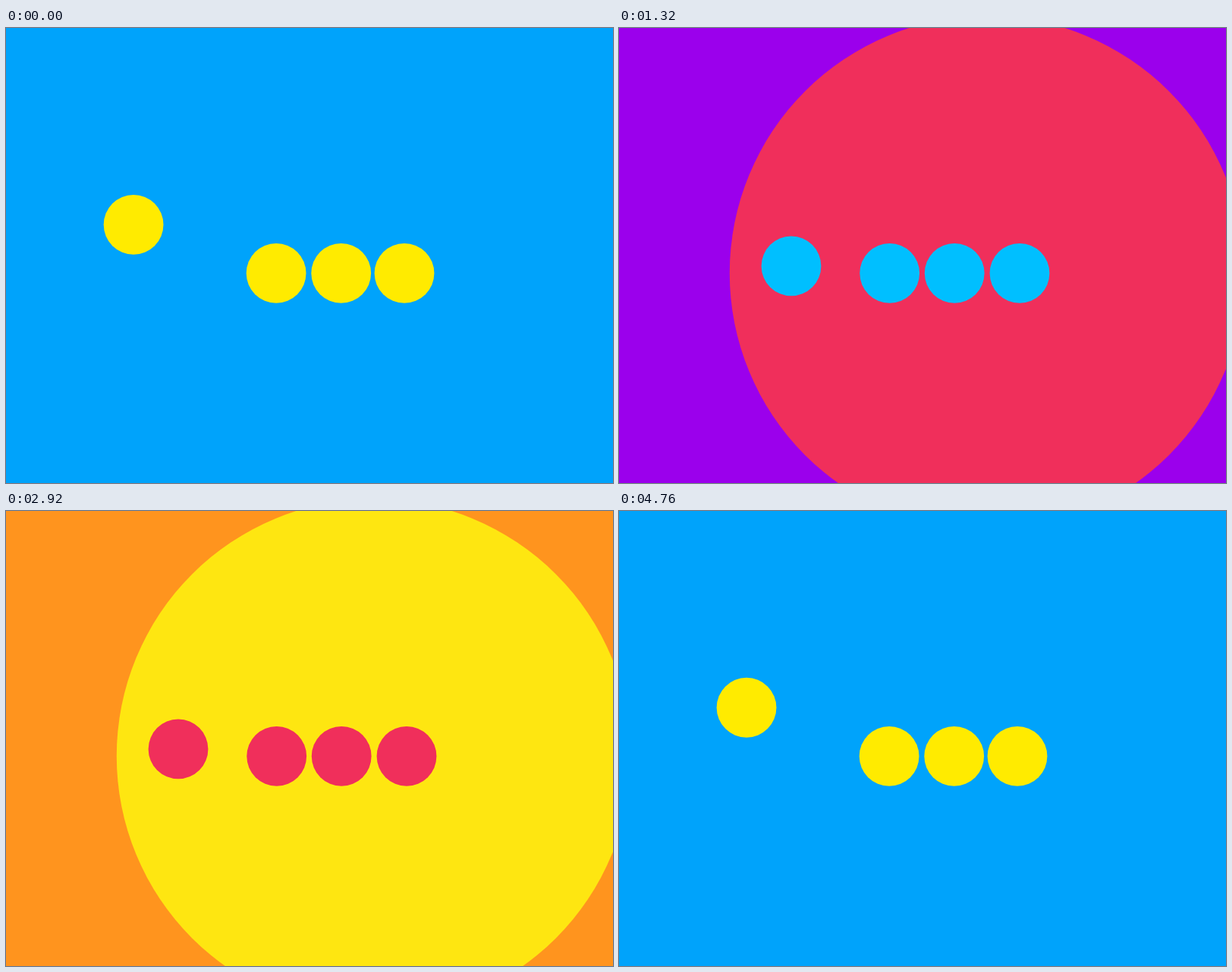
Recreate the animation shown at these times as an HTML page with a canvas. Size 800x600 px, loop 4.78 s.

```html
<!DOCTYPE html>
<html lang="en">
<head>
<meta charset="utf-8">
<title>Cradle</title>
<style>
  html, body { margin: 0; width: 100%; height: 100%; overflow: hidden; }
  canvas { display: block; width: 800px; height: 600px; }
</style>
</head>
<body>
<canvas id="stage" width="800" height="600"></canvas>
<script>
const ctx = document.getElementById('stage').getContext('2d');
const LOOP = 4780, PERIOD = 1600, HALF = 800, HIT = 460;
const RADIUS = 39.4, FLOOR = 323.3;

// [background, balls], advancing by one at each impact
const THEMES = [
  ['#00a3fb', '#ffeb00'],
  ['#9b00ec', '#14ff2b'],
  ['#f02f5b', '#00bfff'],
  ['#ff941e', '#6527c8'],
  ['#fee611', '#f02f5b'],
  ['#20c44a', '#ffae1b']
];

// Times are counted from the moment the ball is launched
const LEFT = { dir: -1, pivot: 273, rest: 275.5, arm: 118, angle: 62.8, apex: 300 };
const RIGHT = { dir: 1, pivot: 528, rest: 525, arm: 124, angle: 59.6, apex: 263 };

const mod = (a, b) => ((a % b) + b) % b;
const clamp = v => Math.min(1, Math.max(0, v));
const smooth = v => { v = clamp(v); return v * v * (3 - 2 * v); };
const mix = (a, b, k) => a + (b - a) * k;

function disc(x, y, r, color) {
  ctx.fillStyle = color;
  ctx.beginPath();
  ctx.arc(x, y, r, 0, Math.PI * 2);
  ctx.fill();
}

function swing(side, t) {
  let lift = 0;
  if (t < side.apex) lift = 1 - (1 - t / side.apex) ** 2;
  else if (t < HALF) lift = 1 - ((t - side.apex) / (HALF - side.apex)) ** 2.97;
  const a = lift * side.angle * Math.PI / 180;
  const settle = t < HALF ? 1 - smooth(t / 60) : smooth((t - HALF - 100) / 140);
  return [
    mix(side.pivot, side.rest, settle) + side.dir * side.arm * Math.sin(a),
    FLOOR - side.arm * (1 - Math.cos(a))
  ];
}

function draw(time) {
  const step = Math.floor((time - HIT) / HALF) + 1;
  const since = mod(time - HIT, HALF);
  const fromLeft = step % 2 === 1;
  const count = THEMES.length;
  const [bg, ink] = THEMES[step % count];

  // The new background spreads from the point of impact
  ctx.fillStyle = THEMES[(step + count - 1) % count][0];
  ctx.fillRect(0, 0, 800, 600);
  if (since > 180) {
    ctx.fillStyle = bg;
    ctx.fillRect(0, 0, 800, 600);
  } else {
    disc(fromLeft ? 316 : 485, FLOOR, 409 * (since / 80) ** 0.69, bg);
  }

  const nudge = 1 - (1 - clamp(since / 120)) ** 3;
  const push = fromLeft ? nudge : 1 - nudge;
  const balls = [
    swing(LEFT, mod(time - HIT - HALF, PERIOD)),
    [mix(356.1, 361.1, push), FLOOR],
    [mix(441.7, 445.7, push), FLOOR],
    swing(RIGHT, mod(time - HIT, PERIOD))
  ];
  for (const [x, y] of balls) disc(x, y, RADIUS, ink);
}

const start = performance.now();
function tick() {
  draw((performance.now() - start) % LOOP);
  requestAnimationFrame(tick);
}
tick();
</script>
</body>
</html>
```
